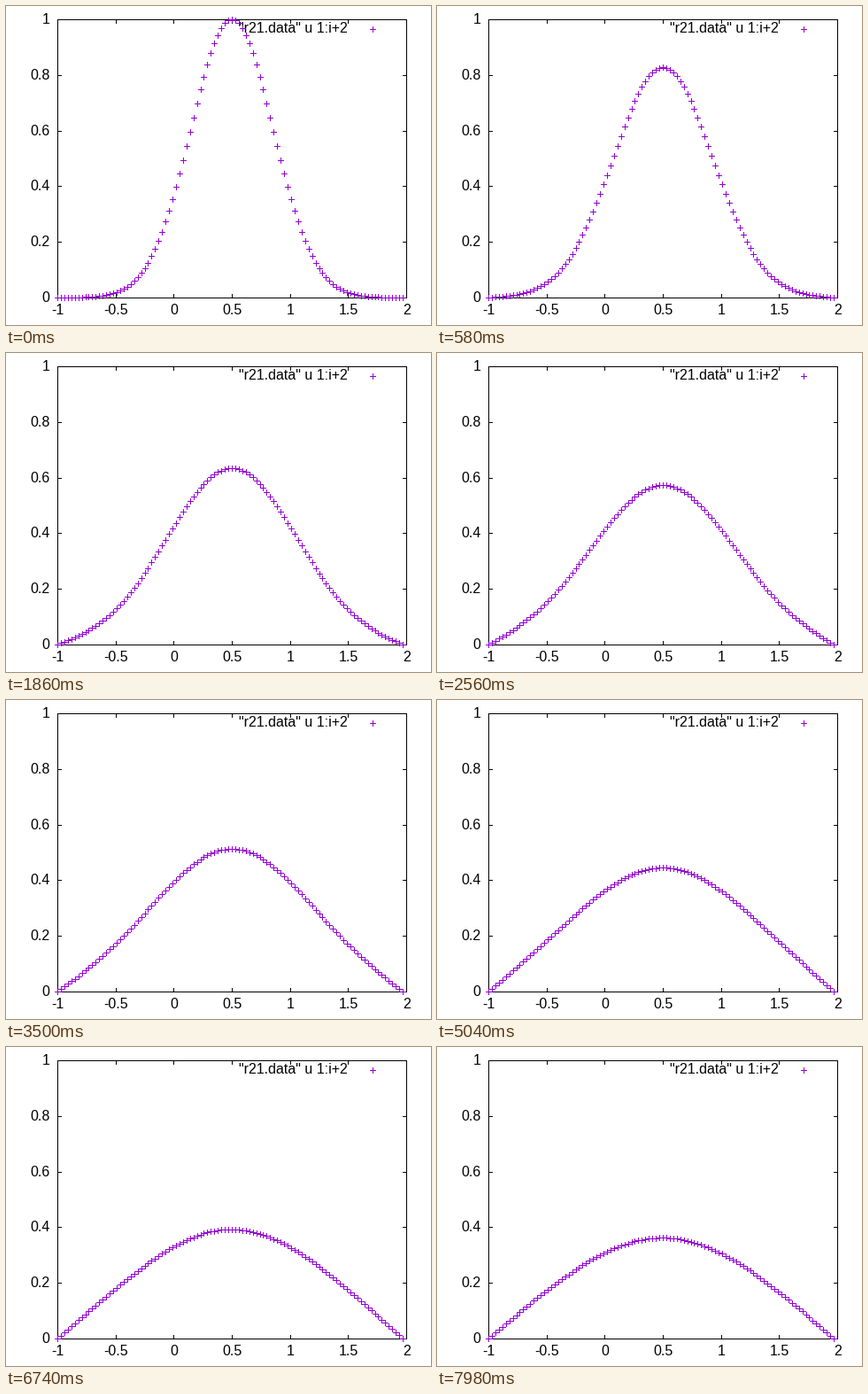
Write a matplotlib script that moves like this. It is 480 by 360 pixels and loops after 8 s.

```python
import numpy as np
import matplotlib.pyplot as plt
from matplotlib.animation import FuncAnimation

W, H, DPI = 480, 360, 80
PX = 72 / DPI                      # one pixel in points
LEFT, RIGHT, TOP, BOTTOM = 58, 452, 15, 329
FRAMES, INTERVAL = 400, 20
N, DX = 99, 0.03                   # grid intervals and spacing
DIFFUSION = 0.001                  # diffusivity times time per frame
PURPLE = "#9400d3"

plt.rcParams["font.family"] = "Liberation Sans"
fig = plt.figure(figsize=(W / DPI, H / DPI), dpi=DPI, facecolor="white")
ax = fig.add_axes([0, 0, 1, 1])
ax.set_xlim(0, W)
ax.set_ylim(H, 0)
ax.axis("off")


def px(x):
    return np.floor(LEFT + (x + 1) * (RIGHT - LEFT) / 3 + 0.5)


def py(y):
    return BOTTOM - np.floor(y * (BOTTOM - TOP) + 0.5)


def strokes(color, z):
    line, = ax.plot([], [], color=color, lw=PX, snap=False, zorder=z,
                    solid_capstyle="butt", solid_joinstyle="miter")
    return line


def segments(parts):
    """Join pixel runs (x0, y0, x1, y1), ends included, into one broken line."""
    xs, ys = [], []
    for x0, y0, x1, y1 in parts:
        if y0 == y1:
            xs += [x0, x1 + 1, np.nan]
            ys += [y0 + 0.5, y0 + 0.5, np.nan]
        else:
            xs += [x0 + 0.5, x0 + 0.5, np.nan]
            ys += [y0, y1 + 1, np.nan]
    return xs, ys


def pluses(xs, ys):
    parts = []
    for x, y in zip(xs, ys):
        parts += [(x - 3, y, x + 3, y), (x, y - 3, x, y + 3)]
    return segments(parts)


def label(x, y, text, align):
    ax.text(x, y, text, fontsize=16 * PX, ha=align, va="baseline", zorder=1)


# Border, ticks and labels
parts = [(LEFT, TOP, RIGHT, TOP), (LEFT, BOTTOM, RIGHT, BOTTOM),
         (LEFT, TOP, LEFT, BOTTOM), (RIGHT, TOP, RIGHT, BOTTOM)]
for v in np.arange(-1, 2.1, 0.5):
    x = px(v)
    parts += [(x, TOP, x, TOP + 4), (x, BOTTOM - 4, x, BOTTOM)]
    label(x + 0.5, 348, f"{v:g}", "center")
for k in range(6):
    y = py(k / 5)
    parts += [(LEFT, y, LEFT + 4, y), (RIGHT - 4, y, RIGHT, y)]
    label(49.5, y + 5, f"{k / 5:g}", "right")
strokes("black", 2).set_data(*segments(parts))

# Key
label(386, 30, '"r21.data" u 1:i+2', "right")
strokes(PURPLE, 3).set_data(*pluses([414], [26]))

# Heat equation with both ends held at zero, solved in sine modes
grid = np.arange(N + 1)
x = -1 + DX * grid
u0 = np.exp(-4 * (x - 0.5) ** 2)
u0[[0, -1]] = 0
mode = np.arange(1, N)
basis = np.sin(np.pi * np.outer(grid, mode) / N)
coef = 2 / N * u0 @ basis
rate = DIFFUSION * (np.pi * mode / (N * DX)) ** 2
curve = strokes(PURPLE, 3)


def update(i):
    u = basis @ (coef * np.exp(-rate * i))
    curve.set_data(*pluses(px(x), py(u)))
    return curve,


anim = FuncAnimation(fig, update, frames=FRAMES, interval=INTERVAL,
                     repeat=True, repeat_delay=0)
plt.show()
```
